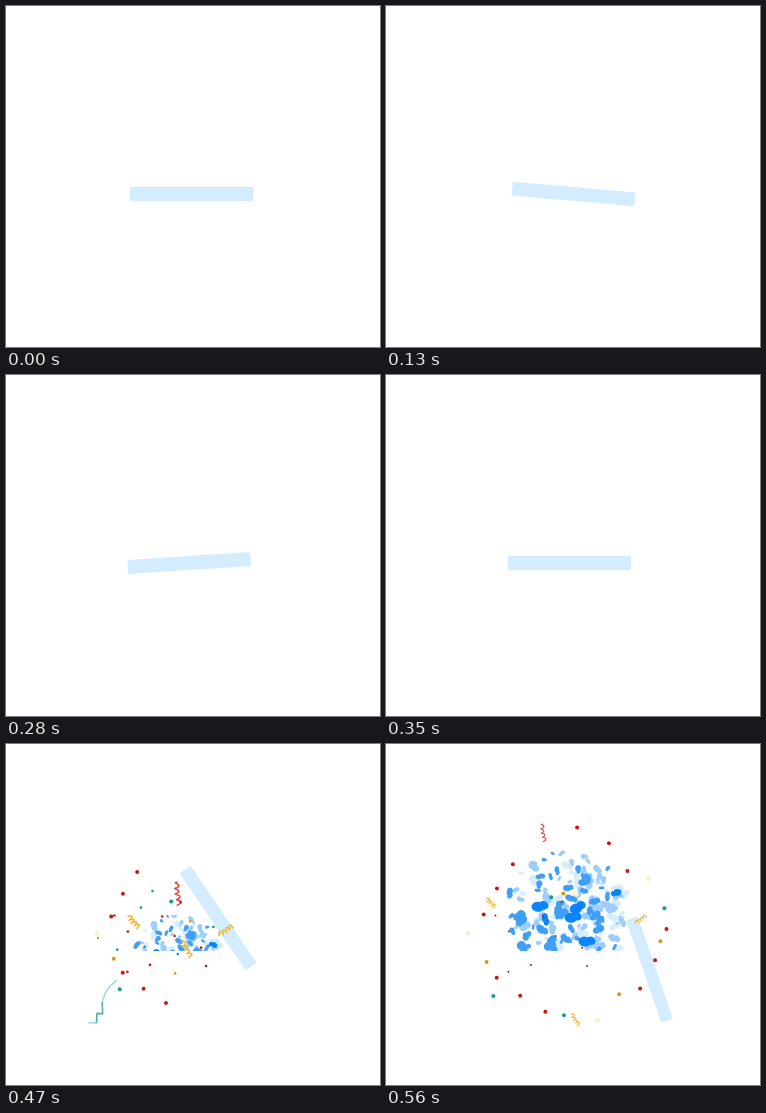
An HTML page with a canvas for the animation above (1.46 s loop, 374 px wide and 341 px high).

```html
<!DOCTYPE html>
<html lang="en">
<head>
<meta charset="utf-8">
<title>Confetti pop</title>
<style>
  html, body { margin: 0; width: 100%; height: 100%; overflow: hidden; background: #fff; }
  canvas { display: block; }
</style>
</head>
<body>
<canvas id="stage" width="374" height="341"></canvas>
<script>
const ctx = document.getElementById('stage').getContext('2d');
const LOOP = 1460, POP = 410, BLOOM = 470, REST = 560, FLOOR = 207;
const RED = '#c8190f', TEAL = '#0f9d94', AMBER = '#d9981a', GOLD = '#eebb3c',
      CREAM = '#fcefd0', CORAL = '#dc4a40';
const BLUES = ['#d6edfe', '#9ccdfd', '#3f9ff6', '#0a84fb'];
const GOLDEN = Math.PI * (3 - Math.sqrt(5));

const mix = (a, b, k) => a + (b - a) * k;
const part = (t, a, b) => Math.max(0, Math.min(1, (t - a) / (b - a)));
const easeOut = k => 1 - (1 - k) ** 2;
const rad = deg => deg * Math.PI / 180;
const many = (n, make) => Array.from({ length: n }, (_, i) => make(i));

let seed = 11;
const rnd = (a = 0, b = 1) => {
  seed = seed * 16807 % 2147483647;
  return mix(a, b, seed / 2147483647);
};

// Values of a keyed track at time t; each key is [time, ...values].
function at(keys, t) {
  let i = 0;
  while (i < keys.length - 2 && t >= keys[i + 1][0]) i++;
  const a = keys[i], b = keys[i + 1], k = part(t, a[0], b[0]);
  return a.slice(1).map((v, j) => mix(v, b[j + 1], k));
}

// The picture changes every 60 ms at first, then every 30 ms.
function snap(t) {
  if (t < 70) return 0;
  if (t < 190) return t < 130 ? 70 : 130;
  if (t < 350) return Math.min(190 + Math.floor((t - 190) / 30) * 30, 310);
  return Math.min(350 + Math.floor((t - 350) / 30) * 30, REST);
}

function place(x, y, angle, paint) {
  ctx.save();
  ctx.translate(x, y);
  ctx.rotate(angle);
  paint();
  ctx.restore();
}

function dot(colour, x, y, r) {
  ctx.fillStyle = colour;
  ctx.beginPath();
  ctx.arc(x, y, r, 0, Math.PI * 2);
  ctx.fill();
}

// time, centre x, centre y, angle, scale
const LID = [
  [0, 185.5, 188, 0, 1], [130, 187.5, 188, 5, 1], [220, 183, 188, -7, 1],
  [350, 183.5, 188, 0, 1], [POP, 187.5, 180, 26.6, .965],
  [BLOOM, 212, 174, 55.8, .955], [REST, 263.5, 225.5, 71, .88]
];

function lid(t) {
  const [x, y, angle, size] = at(LID, t);
  place(x, y, rad(angle), () => {
    ctx.scale(size, size);
    ctx.fillStyle = '#d3edfe';
    ctx.fillRect(-61.5, -7, 123, 14);
  });
}

// Blue flakes fill a heap, narrow at the top and wide below.
const flakes = many(165, () => {
  const y = mix(109, 206, rnd() ** .75), w = rnd(2, 6.5);
  const half = 10 + 49 * easeOut(part(y, 107, 150));
  return {
    x: 181 + rnd(-half, half), y, w, h: w * rnd(.45, .8), angle: rnd(0, Math.PI),
    tone: Math.floor(rnd(0, 3.15))
  };
});
// The large dark ones that catch the eye
[[154, 163], [192, 164], [187, 174], [201, 198]].forEach(([x, y]) =>
  flakes.push({ x, y, w: 8.5, h: 5, angle: rnd(-.5, .5), tone: 3 }));
flakes.sort((a, b) => a.tone - b.tone);

function drawFlakes(t) {
  if (t <= POP) return;
  const k = part(t, BLOOM, REST), rise = 40 * (1 - part(t, POP, BLOOM));
  const spread = mix(.72, 1, k), size = mix(.8, 1, k);
  ctx.save();
  ctx.beginPath();
  ctx.rect(0, 0, 374, FLOOR);
  ctx.clip();
  flakes.forEach(({ x, y, w, h, angle, tone }) => {
    const px = mix(172, 181, k) + (x - 181) * spread;
    const py = mix(172, 109, k) + (y - 109) * spread + rise;
    place(px, py, angle + (1 - k) * .6, () => {
      ctx.scale(size, size);
      ctx.fillStyle = BLUES[tone];
      ctx.beginPath();
      ctx.ellipse(-w * .25, 0, w * .75, h, 0, 0, Math.PI * 2);
      ctx.ellipse(w * .45, -h * .4, w * .55, h * .8, .5, 0, Math.PI * 2);
      ctx.fill();
    });
  });
  ctx.restore();
}

// Small specks scattered at once; only every other one lasts.
const specks = many(18, i => {
  const a = i * GOLDEN, d = Math.sqrt((i + 1) / 18);
  return {
    x: 155 + Math.cos(a) * d * 62, y: 190 + Math.sin(a) * d * 48,
    colour: [RED, TEAL, RED, TEAL, RED, AMBER][i % 6], end: i % 2 ? 500 : LOOP
  };
});

function drawSpecks(t) {
  if (t < POP) return;
  const out = part(t, POP, BLOOM), k = part(t, BLOOM, REST);
  specks.forEach(({ x, y, colour, end }) => {
    if (t <= end) dot(colour, x - out + k, y + out * 2, mix(1.3, 1, k));
  });
}

// Larger dots fly out to a ring, those on the left first.
const ring = many(24, i => {
  const a = i * GOLDEN, d = i % 8 === 7 ? .35 : rnd(.75, 1);
  const colour = [RED, TEAL, RED, AMBER, RED, CREAM][i % 6];
  return {
    x: 182 + Math.cos(a) * d * 104, y: 185 + Math.sin(a) * d * 102,
    colour, r: colour === CREAM ? 2.6 : 2
  };
});

function drawRing(t) {
  ring.forEach(({ x, y, colour, r }) => {
    const from = x < 170 ? POP : BLOOM, k = easeOut(part(t, from, from + 90));
    if (k) dot(colour, mix(165, x, k), mix(190, y, k), r);
  });
}

// One stiff ribbon that swings down as it falls.
const RIBBON = [[0, 0], [9, 2.5], [17.5, 2.4], [26.5, 0], [36, -7], [39, -2], [47, -7], [51.5, 0]];

function ribbon(t) {
  if (t < POP || t > 500) return;
  const k = (t - POP) / 60;
  const line = (colour, width, pts) => {
    ctx.strokeStyle = colour;
    ctx.lineWidth = width;
    ctx.beginPath();
    pts.forEach(p => ctx.lineTo(...p));
    ctx.stroke();
  };
  place(mix(134, 111, k), 188 + 48 * Math.min(k, 1.2), rad(mix(156, 124, k)), () => {
    ctx.globalAlpha = k > 1 ? .4 : 1;
    ctx.lineJoin = 'round';
    line('#a3dfe0', 1.7, RIBBON);
    line('#52b3a3', 1.4, RIBBON.slice(3, 7));
  });
}

// Curls: colour, centre on the way, centre at rest, length, angle
const CURLS = [
  [CORAL, 172, 150, 157.5, 89, 20, 88], [GOLD, 128, 177.5, 105, 158.5, 13, 58],
  [GOLD, 219.5, 186, 254.5, 175, 14, -24], [GOLD, 181, 205, 189.5, 275.5, 15, 68]
];

function curl([colour, x0, y0, x1, y1, size, angle], t) {
  const k = part(t, BLOOM, REST), out = part(t, POP, BLOOM);
  const len = size * out * mix(1.25, .95, k), swing = mix(2, 1.4, k);
  place(mix(175, mix(x0, x1, k), out), mix(195, mix(y0, y1, k), out), rad(angle), () => {
    ctx.strokeStyle = colour;
    ctx.lineWidth = mix(1.5, 1.1, k);
    ctx.beginPath();
    for (let p = 0; p <= 1; p += 1 / 40) {
      const a = p * Math.PI * 9;
      ctx.lineTo((p - .5) * len + Math.cos(a) * .4, Math.sin(a) * swing + Math.sin(p * 5));
    }
    ctx.stroke();
  });
}

function draw(t) {
  ctx.fillStyle = '#fff';
  ctx.fillRect(0, 0, 374, 341);
  lid(t);
  drawFlakes(t);
  ribbon(t);
  if (t > POP) CURLS.forEach(c => curl(c, t));
  drawSpecks(t);
  drawRing(t);
}

const start = performance.now();
function tick() {
  draw(snap((performance.now() - start) % LOOP));
  requestAnimationFrame(tick);
}
tick();
</script>
</body>
</html>
```
